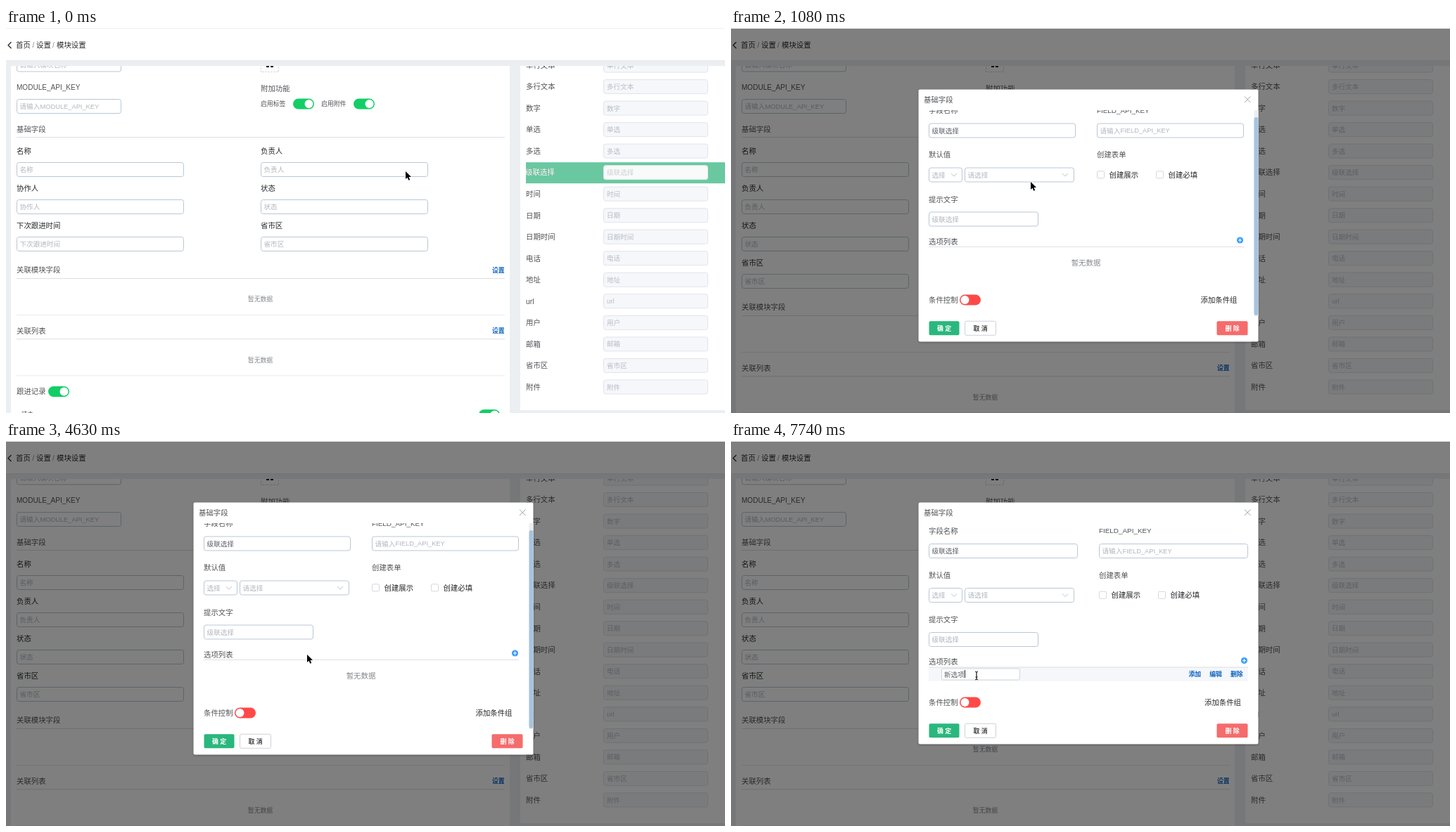
These frames come from a looping animation (1022 px wide and 548 px high, 8 s). An HTML page with a canvas:

```html
<!DOCTYPE html>
<html lang="zh">
<head>
<meta charset="utf-8">
<style>
html, body { margin: 0; width: 100%; height: 100%; overflow: hidden; background: #fff; }
canvas { display: block; }
</style>
</head>
<body>
<canvas id="stage" width="1022" height="548"></canvas>
<script>
const W = 1022, H = 548, LOOP = 8000;
const screen2d = document.getElementById('stage').getContext('2d');
const layer = document.createElement('canvas');
layer.width = W; layer.height = H;
const layer2d = layer.getContext('2d');
let g = screen2d;

const FONT = '"Liberation Sans", "Noto Sans CJK SC", "Noto Sans CJK", sans-serif';
const INK = '#25272a', SOFT = '#505256', HINT = '#b1b6be', BLUE = '#0b62c1', GREEN = '#13ce66';
const EDGE = '#b9c7d6', RULE = '#dcdfe3';

// y is the optical middle of the line
function text(s, x, y, size = 10.4, color = INK, weight = 400, align = 'left') {
  g.font = `${weight} ${size}px ${FONT}`;
  g.fillStyle = color;
  g.textAlign = align;
  g.fillText(s, x, y + size * 0.37);
}

function rect(x, y, w, h, color) {
  g.fillStyle = color;
  g.fillRect(x, y, w, h);
}

function box(x, y, w, h, fill, stroke, r = 3) {
  g.beginPath();
  g.roundRect(x + 0.5, y + 0.5, w - 1, h - 1, r);
  if (fill) { g.fillStyle = fill; g.fill(); }
  if (stroke) { g.strokeStyle = stroke; g.lineWidth = 1; g.stroke(); }
}

function poly(points, color, width = 1) {
  g.beginPath();
  points.forEach(([x, y]) => g.lineTo(x, y));
  g.strokeStyle = color;
  g.lineWidth = width;
  g.stroke();
}

function disc(x, y, r, fill, stroke) {
  g.beginPath();
  g.arc(x, y, r, 0, 7);
  if (fill) { g.fillStyle = fill; g.fill(); }
  if (stroke) { g.strokeStyle = stroke; g.lineWidth = 1; g.stroke(); }
}

function clipped(x, y, w, h, draw) {
  g.save();
  g.beginPath();
  g.rect(x, y, w, h);
  g.clip();
  draw();
  g.restore();
}

function input(x, cy, w, hint, color = HINT, edge = EDGE) {
  box(x, cy - 10.5, w, 21, '#fff', edge);
  text(hint, x + 4.5, cy, 9.6, color);
}

function disabledInput(x, cy, w, hint) {
  box(x, cy - 10.5, w, 21, '#f5f7fa', '#e0e4ea');
  text(hint, x + 5, cy, 9.6, '#b8bcc4');
}

function keyInput(x, cy, w, key) {
  input(x, cy, w, '请输入');
  text(key, x + 33.5, cy, 9.3, HINT);
}

function toggle(x, cy, on) {
  g.beginPath();
  g.roundRect(x, cy - 7.5, 30, 15, 7.5);
  g.fillStyle = on ? GREEN : '#ff4949';
  g.fill();
  disc(on ? x + 22.5 : x + 7.5, cy, 6, '#fff');
}

function chevron(x, y, up) {
  const d = up ? -2 : 2;
  poly([[x - 4, y - d], [x, y + d], [x + 4, y - d]], '#c0c4cc');
}

// ---- page ----

function header() {
  rect(0, 0, W, 47, '#fff');
  rect(0, 0, W, 1, '#eef0f1');
  rect(0, 46, W, 1, '#e3e6e9');
  poly([[7.5, 20], [3, 24.5], [7.5, 29]], '#222', 1.2);
  text('首页', 14, 24, 10.4, INK, 500);
  text('/', 37.5, 24, 10, '#888');
  text('设置', 43, 24, 10.4, INK, 500);
  text('/', 66, 24, 10, '#888');
  text('模块设置', 72, 24, 10.4, INK, 500);
}

function emptySection(title, y) {
  text(title, 15, y, 10.4, SOFT);
  text('设置', 691, y, 8.9, BLUE, 700);
  rect(15, y + 11.5, 694, 1, RULE);
  text('暂无数据', 361.5, y + 41.5, 8.9, '#85888d', 500, 'center');
  rect(15, y + 63.5, 694, 1, '#e8eaed');
}

function grid(names, y) {
  names.forEach((name, i) => {
    const x = i % 2 ? 362 : 15, top = y + (i >> 1) * 53;
    text(name, x, top, 10.4, INK, 500);
    input(x, top + 26.5, 238, name);
  });
}

function formPanel(mode) {
  rect(7, 54, 709, H - 54, '#fff');
  clipped(7, 54, 709, H - 54, () => {
    input(15, 52, 149, '请输入模块名称');
    g.setLineDash([2, 2]);
    box(362, 40, 26, 23, null, '#c4c8cc', 0);
    g.setLineDash([]);
    rect(370, 52, 4, 4, '#222');
    rect(376, 52, 4, 4, '#222');
    text('MODULE_API_KEY', 15, 84, 10.05, SOFT);
    keyInput(15, 111.5, 149, 'MODULE_API_KEY');
    text('附加功能', 362, 86, 10.4, SOFT);
    text('启用标签', 362, 108, 8.9, SOFT);
    toggle(408, 108, true);
    text('启用附件', 448, 108, 8.9, SOFT);
    toggle(494, 108, true);
    text('基础字段', 15, 144.5, 10.4, SOFT);
    rect(15, 155, 694, 1, RULE);

    const rest = ['负责人', '协作人', '状态', '下次跟进时间', '省市区'];
    let y = 344.5;
    if (mode === 'before') {
      grid(['名称', ...rest], 175);
    } else if (mode === 'drop') {
      grid(['名称'], 175);
      disabledInput(15, 227, 149, '级联选择');
      grid(rest, 249);
      y = 418.5;
    } else {
      grid(['名称', '级联选择', ...rest], 175);
      y = 397.5;
    }
    emptySection('关联模块字段', y);
    emptySection('关联列表', y + 86.3);
    text('跟进记录', 15, y + 173, 10.4, SOFT);
    toggle(60, y + 173, true);
    text('待办', 22, y + 205, 8.9, SOFT, 500);
    toggle(672, y + 206, true);
  });
}

function typePanel(dragging) {
  const types = ['单行文本', '多行文本', '数字', '单选', '多选', '级联选择', '时间', '日期',
    '日期时间', '电话', '地址', 'url', '用户', '邮箱', '省市区', '附件'];
  rect(731, 54, 291, 490, '#fff');
  clipped(731, 54, 291, 490, () => types.forEach((name, i) => {
    const y = 53 + i * 30.53;
    if (dragging && i === 5) {
      rect(739, y - 14.5, 283, 30, '#6ac8a1');
      text(name, 739, y, 10.4, '#829b90');
      text(name, 738.3, y, 10.4, '#fff');
      box(849, y - 10.5, 149, 21, '#f9fafa', '#dfe9e5');
      text(name, 854, y, 9.6, '#ccd0d4');
    } else {
      text(name, 739, y, 10.4, SOFT);
      disabledInput(849, y, 149, name);
    }
  }));
}

function page(n) {
  rect(0, 0, W, H, '#ebeff2');
  formPanel(n < 2 ? 'before' : n < 6 ? 'drop' : 'placed');
  typePanel(n < 5);
  header();
  if (n === 5) {
    rect(408, 202, 290, 41, '#fcfcfc');
    rect(408, 207, 267, 36, '#fff');
  }
}

// ---- dialog ----

function button(x, cy, w, label, fill, edge, color) {
  box(x, cy - 10.5, w, 21, fill, edge, 2);
  text(label, x + w / 2, cy, 8.9, color, 700, 'center');
}

function checkbox(x, cy, label) {
  box(x, cy - 5.5, 11, 11, '#fff', '#d4d8df', 1);
  text(label, x + 17.5, cy, 10.4, INK, 500);
}

function dialog(added, open, hover, caret) {
  const dy = added ? 10.5 : 0, end = added ? 432 : 447;
  const x2 = added ? 523 : 520, right = added ? 735 : 729, w = right - x2;
  g.save();
  g.shadowColor = 'rgba(0,0,0,.3)';
  g.shadowBlur = 3;
  g.shadowOffsetY = 1;
  box(266, 87, 484, end - 87, '#fff', null, 2);
  g.restore();
  text('基础字段', 274, 102, 10.4, SOFT, 500);
  poly([[730, 97.5], [738.5, 106]], '#9ea3aa');
  poly([[738.5, 97.5], [730, 106]], '#9ea3aa');

  clipped(266, 117, 484, end - 117, () => {
    text('字段名称', 281, 117.2 + dy, 10.4, SOFT);
    text('FIELD_API_KEY', x2, 117 + dy, 9.9, SOFT);
    input(281, 146 + dy, w, '级联选择', '#5b5f66');
    keyInput(x2, 146 + dy, w, 'FIELD_API_KEY');
    text('默认值', 281, 180.3 + dy, 10.4, SOFT);
    text('创建表单', x2, 180.3 + dy, 10.4, SOFT);
    input(281, 209 + dy, 48, '选择');
    chevron(317, 209 + dy);
    input(332, 209 + dy, 156, '请选择', HINT, open ? '#409eff' : EDGE);
    chevron(475, 209 + dy, open > 0);
    checkbox(x2, 208.8 + dy, '创建展示');
    checkbox(x2 + 84, 208.8 + dy, '创建必填');
    text('提示文字', 281, 243.7 + dy, 10.4, SOFT);
    input(281, 272 + dy, 156, '级联选择');
    if (hover) rect(281, 322, 454, 20, '#f5f7fa');
    text('选项列表', 281, 304 + dy, 10.4, SOFT);
    rect(281, 311 + dy, right - 281, 1, RULE);
    disc(right - 5.5, 302 + dy, 4.6, '#409eff');
    poly([[right - 8, 302 + dy], [right - 3, 302 + dy]], '#fff');
    poly([[right - 5.5, 299.5 + dy], [right - 5.5, 304.5 + dy]], '#fff');
    if (added) {
      box(299, 323.5, 112, 17, '#fff', '#cfd5dc', 2);
      text('新选项', 303, 332, 9.6, '#5b5f66');
      if (caret) rect(332, 326, 1, 11, '#222');
      if (hover) ['添加', '编辑', '删除'].forEach((s, i) => text(s, 650.5 + i * 29.7, 332, 8.9, BLUE, 700));
    } else {
      text('暂无数据', 504.5, 334.5, 10.4, '#85888d', 400, 'center');
      rect(743.5, 117, 6, 293, '#eceef0');
      g.beginPath();
      g.roundRect(743.5, 127, 6, 282, 3);
      g.fillStyle = '#a7c3de';
      g.fill();
    }
    text('条件控制', 281, end - 60, 10.4, SOFT);
    toggle(325, end - 60, false);
    text('添加条件组', added ? 673 : 667.5, end - 60.3, 10.4, INK, 500);
    button(281, end - 19.7, 44, '确 定', '#2ab77d', null, '#fff');
    button(332, end - 19.7, 45, '取 消', '#fff', '#cdd2d8', '#444');
    button(690, end - 19.7, 45, '删 除', '#f56c6c', null, '#fff');
  });
  if (open) dropdown(open);
}

function dropdown(open) {
  g.save();
  g.globalAlpha = open;
  g.translate(0, 228);
  g.scale(1, open);
  g.translate(0, -228);
  g.save();
  g.shadowColor = 'rgba(0,0,0,.12)';
  g.shadowBlur = 8;
  g.shadowOffsetY = 1;
  box(332, 228, 135, 146, '#fff', null);
  g.restore();
  box(332, 228, 135, 146, null, '#dfe3e9');
  disc(352.5, 245, 5, '#fff', '#dcdfe6');
  text('新选项1', 365, 245.3, 10.4, SOFT);
  poly([[451.5, 241], [455.5, 245], [451.5, 249]], '#606266');
  g.restore();
}

// ---- pointer ----

const PATH = [
  [0, 568, 204], [4, 432, 220], [5, 426, 219], [8, 426, 219], [11, 385, 207], [13, 350, 212],
  [16, 350, 212], [18, 372, 240], [20, 440, 246], [22, 509, 262], [24, 526, 290], [26, 470, 250],
  [28, 380, 214], [30, 410, 270], [31, 428, 304], [32, 643, 328], [33, 522, 315], [34, 522, 315],
  [35, 570, 303], [38, 700, 287], [40, 721, 299], [42, 721, 299], [44, 640, 318], [46, 500, 330], [49, 349, 334]
];

function pointerAt(n) {
  const i = PATH.findIndex(p => p[0] >= n);
  if (i < 0) return PATH[PATH.length - 1].slice(1);
  if (i === 0) return PATH[0].slice(1);
  const [a, ax, ay] = PATH[i - 1], [b, bx, by] = PATH[i];
  const k = (n - a) / (b - a);
  return [ax + (bx - ax) * k, ay + (by - ay) * k];
}

const ARROW = new Path2D('M0 0V11L2.5 8.7 4.3 12.7 6.2 11.9 4.5 8H8Z');
const HAND = new Path2D('M0 .8Q1-.4 2 .8V4.2L3.3 3.9 4.6 4.3 6 4.6 7.2 5.2V8.5L6.2 12H1L-2.7 7.5Q-2.8 5.8-1.2 6.5L0 7.6Z');

function pointer(x, y, kind) {
  g.save();
  g.translate(x, y);
  if (kind === 'beam') {
    poly([[-2, -6], [0, -5], [2, -6]], '#111');
    poly([[0, -5], [0, 5]], '#111', 1.2);
    poly([[-2, 6], [0, 5], [2, 6]], '#111');
    poly([[-1.5, 2], [1.5, 2]], '#111');
  } else {
    const hand = kind === 'hand';
    const shape = hand ? HAND : ARROW;
    g.lineJoin = 'round';
    g.lineWidth = hand ? 1.2 : 1.6;
    g.strokeStyle = hand ? '#111' : '#fff';
    g.fillStyle = hand ? '#fff' : '#000';
    g.stroke(shape);
    g.fill(shape);
  }
  g.restore();
}

const inside = (x, y, l, t, r, b) => x >= l && x <= r && y >= t && y <= b;

function render(t) {
  const n = Math.max(0, Math.floor((t - 34) / 148));
  const [x, y] = pointerAt(n);
  const added = n >= 42;
  const open = n < 15 || n > 29 ? 0 : n === 15 ? 0.75 : n === 29 ? 0.4 : 1;
  const hover = n > 42 && inside(x, y, 281, 322, 735, 341);
  const caret = Math.floor((n - 42) * 148 / 500) % 2 === 0;

  page(n);
  if (n >= 6) {
    rect(0, 1, W, H - 1, 'rgba(0,0,0,.5)');
    g = layer2d;
    g.clearRect(0, 0, W, H);
    dialog(added, open, hover, caret);
    g = screen2d;
    g.globalAlpha = n === 6 ? 0.85 : 1;
    g.drawImage(layer, 0, n === 6 ? -3 : 0);
    g.globalAlpha = 1;
  }

  let kind = 'arrow';
  if (n > 8 && n < 42 && (inside(x, y, 332, 199, 487, 218) || open && inside(x, y, 332, 232, 467, 258))) kind = 'hand';
  if (n > 42 && inside(x, y, 299, 324, 410, 340)) kind = 'beam';
  pointer(x, y, kind);
}

const start = performance.now();
function tick() {
  render((performance.now() - start) % LOOP);
  requestAnimationFrame(tick);
}
tick();
</script>
</body>
</html>
```
